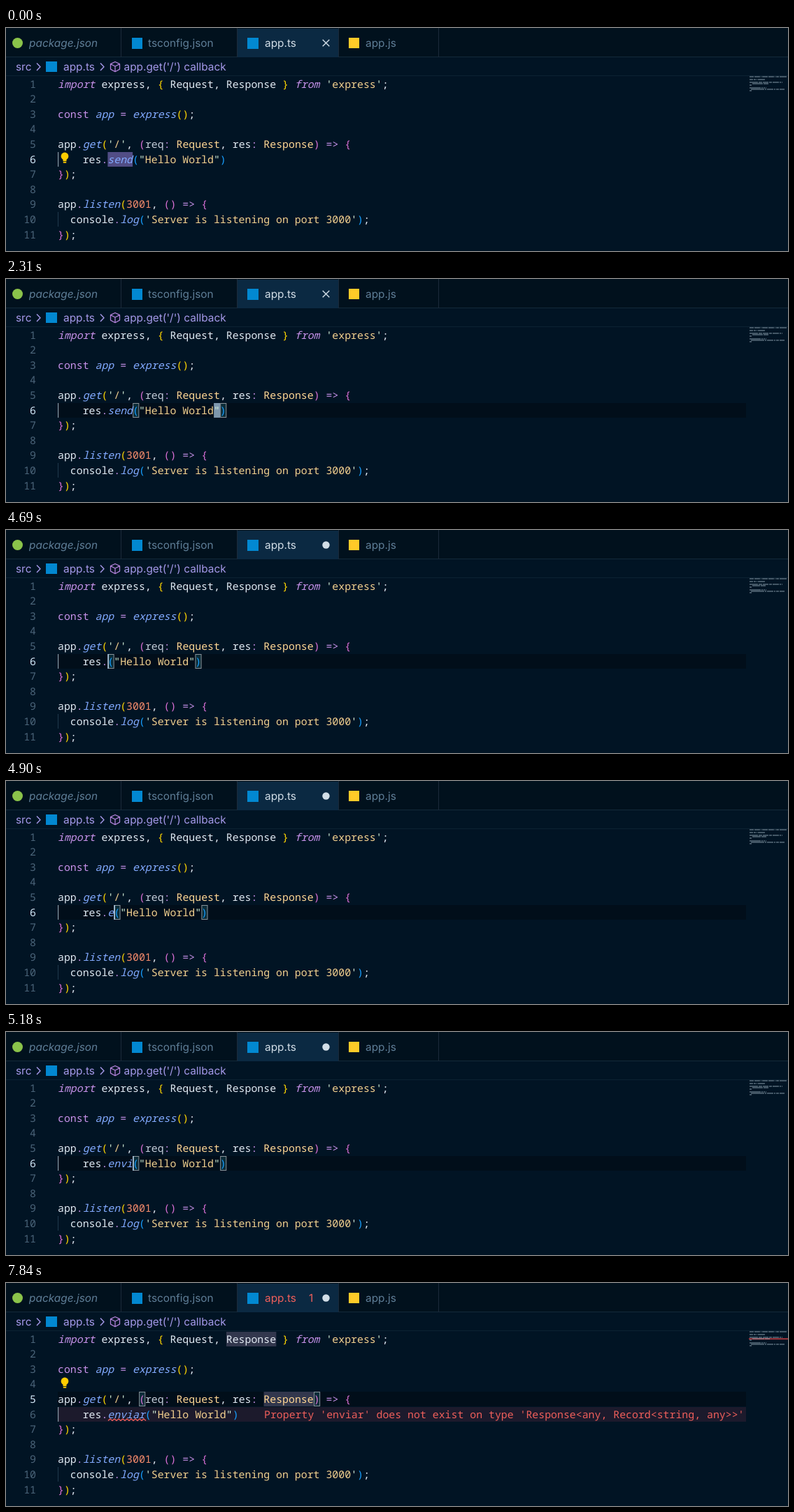
These frames come from a looping animation (1118x320 px, 8 s). An HTML page:

```html
<!DOCTYPE html>
<html lang="en">
<head>
<meta charset="utf-8">
<title>Code editor</title>
<style>
  html, body { margin: 0; width: 100%; height: 100%; overflow: hidden; background: #011424; }
  svg { display: block; width: 1118px; height: 320px; }
  text { white-space: pre; text-rendering: geometricPrecision; }
  .code { font: 500 14.875px "Noto Sans Mono", "DejaVu Sans Mono", monospace; }
  .ui { font: 15.4px Inter, Roboto, sans-serif; }
  .doc { font: 14.3px Inter, Roboto, sans-serif; }
  .slant { font-style: italic; }
</style>
</head>
<body>
<svg id="stage" viewBox="0 0 1118 320" xmlns="http://www.w3.org/2000/svg"></svg>
<script>
const LOOP = 8000, LEFT = 74, CHAR = 8.925, ROW = 21.6;
const CLICK_TYPE = 3080, CLICK_BACK = 6300, ERROR = 5810;
const WHITE = '#e1e9f2', PURPLE = '#c792ea', BLUE = '#82aaff', RED = '#ef5f5b';

// The first character of each code segment picks its style.
const STYLES = {
  w: [WHITE], k: [PURPLE], K: [PURPLE, 1], f: [BLUE, 1], s: ['#f3d08f'], q: ['#d9f5dd'],
  y: ['#ffd694'], p: ['#c3ccd8'], n: ['#f78c6c'], 1: ['#ffd700'], 2: ['#da70d6'], 3: ['#179fff']
};
const codeLines = method => [
  "Kimport|w express, |1{|w Request, Response |1}|K from |q'|sexpress|q'|w;",
  '',
  'kconst |fapp|k = |fexpress|1()|w;',
  '',
  "wapp|k.|fget|1(|q'|s/|q'|w, |2(|preq|k: |yRequest|w, |wres|k: |yResponse|2)|k => |2{",
  `w    res|k.|f${method}|3(|q"|sHello World|q"|3)`,
  '2}|1)|w;',
  '',
  'wapp|k.|flisten|1(|n3001|w, |2()|k => |2{',
  "w  console|k.|flog|3(|q'|sServer is listening on port 3000|q'|3)|w;",
  '2}|1)|w;'
];

const EDITS = [[0, 'send'], [3850, 'sen'], [4060, 'se'], [4270, 's'], [4480, ''],
  [4900, 'e'], [4970, 'en'], [5040, 'env'], [5110, 'envi'], [5250, 'envia'], [5390, 'enviar']];
const CARET_TOGGLES = [1470, 2310, 2590, 3570, 3850, 5880, 6300, 6790, 7350, 7840];

const colX = col => LEFT + col * CHAR;
const rowY = line => Math.round(69.7 + (line - 1) * ROW);
const baseY = line => 85.5 + (line - 1) * ROW;
const within = (t, from, to) => t >= from && t < to;
const esc = s => s.replace(/&/g, '&amp;').replace(/</g, '&lt;');

const rect = (x, y, w, h, fill, more = '') =>
  `<rect x="${x}" y="${y}" width="${w}" height="${h}" fill="${fill}" ${more}/>`;
const path = (d, stroke, width = 1.2) =>
  `<path d="${d}" fill="none" stroke="${stroke}" stroke-width="${width}" stroke-linejoin="round"/>`;
const label = (kind, x, y, str, fill, more = '') =>
  `<text class="${kind}" xml:space="preserve" x="${x}" y="${y}" fill="${fill}" ${more}>${esc(str)}</text>`;
const dot = (x, y, r, fill) => `<circle cx="${x}" cy="${y}" r="${r}" fill="${fill}"/>`;
const cross = (x, y, r, color) =>
  path(`M${x - r} ${y - r}l${2 * r} ${2 * r}m0 ${-2 * r}l${-2 * r} ${2 * r}`, color, 1.4);
const cube = (x, y, color) => path(
  `M${x} ${y - 7}l6.5 3.2v7.4l-6.5 3.6l-6.5 -3.6v-7.4zM${x - 6.5} ${y - 3.8}l6.5 3.3l6.5 -3.3M${x} ${y - .5}v7.5`, color, 1.3);
const chevron = x => path(`M${x} 50.5l5 5.2l-5 5.2`, '#a599e9', 1.4);

const rowBox = (line, fill) => rect(LEFT, rowY(line), 984, 21, fill);
const cellBox = (line, col, len, fill) => rect(colX(col), rowY(line), len * CHAR, 21, fill);
const bracket = (line, col) => rect(colX(col) + .6, rowY(line) + .5, CHAR - .8, 20,
  '#0c2c38', 'stroke="#8a9299" stroke-width="1"');
const bulb = line => {
  const y = rowY(line) + 6;
  return dot(84, y, 5.4, '#fc0') + rect(81.5, y + 3, 5, 4.2, '#fc0') +
    rect(81.8, y + 8, 4.4, 1.7, '#fc0');
};

function codeText(line, source) {
  if (!source) return '';
  const spans = source.split('|').map(part => {
    const [fill, italic] = STYLES[part[0]];
    return `<tspan fill="${fill}"${italic ? ' class="slant"' : ''}>${esc(part.slice(1))}</tspan>`;
  });
  return `<text class="code" xml:space="preserve" x="${LEFT}" y="${baseY(line)}">${spans.join('')}</text>`;
}

function minimap(lines, error) {
  let out = error ? rect(1062, 79.3, 56, 1.8, '#b03a3f') : '';
  lines.forEach((source, i) => {
    const plain = source.split('|').map(p => p.slice(1)).join('');
    for (const word of plain.matchAll(/\S+/g))
      out += rect(1063 + word.index, 69.3 + i * 2, word[0].length, 1.3, '#a9bccb', 'opacity=".6"');
  });
  return out;
}

function tabs(s) {
  const edge = x => rect(x, 0, 1, 42, '#1b2a3a');
  const muted = '#5f7e97', blue = '#0288d1';
  return rect(0, 0, 1118, 42, '#01111d') + rect(0, 41, 1118, 1, '#14293a') +
    rect(331, 1, 145, 41, '#0b2942') + [164, 330, 475, 618].map(edge).join('') +
    dot(16.5, 21.5, 7.5, '#8bc34a') +
    label('ui slant', 33, 27, 'package.json', muted) +
    rect(180, 14, 15, 16, blue) + label('ui', 203, 27, 'tsconfig.json', muted) +
    rect(345, 14, 16, 16, blue) + label('ui', 370, 27, 'app.ts', s.error ? RED : '#d2dee7') +
    (s.error ? label('ui', 433, 27, '1', RED) : '') +
    (s.dirty ? dot(457.5, 21.5, 5.2, '#d2dee7') : cross(457.5, 21.5, 4.8, '#d2dee7')) +
    rect(490, 14, 15, 15, '#ffca28') + label('ui', 514, 27, 'app.js', muted);
}

function breadcrumb() {
  const color = '#a599e9';
  return label('ui', 14, 61, 'src', color) + chevron(44) + rect(57, 48, 16, 15, '#0288d1') +
    label('ui', 82, 61, 'app.ts', color) + chevron(135) + cube(156, 55.5, '#b180d7') +
    label('ui', 168.5, 61, "app.get('/') callback", color) + rect(0, 68, 1118, 1, '#0c2233');
}

function popup() {
  const grey = '#a3a7bd', light = '#d6deeb', bg = '#2c2f43';
  const docs = ['(method) internal.Writable.end(cb?: (()',
    '=> void) | undefined): express.Response<', 'any, Record<string, any>> (+2 overloads)'];
  const chip = (x, y, w, str) => rect(x, y - 14, w, 18, '#464a5c', 'rx="3"') +
    label('code', x + 5, y, str, light);
  return rect(173, 199, 517, 23, '#5f7e9a', 'stroke="#2b3f54"') + cube(186, 211, '#fff') +
    `<text class="code" x="200" y="216.5" fill="#fff"><tspan font-weight="700">ev</tspan>entNames</text>` +
    rect(690, 199, 397, 122, bg, 'stroke="#3b3f54"') +
    docs.map((str, i) => label('code', 697, 221.5 + i * ROW, str, grey)).join('') +
    cross(1073.5, 215, 4.3, light) +
    label('doc', 697, 304.5, 'Calling the', light) + chip(773, 304.5, 132, 'writable.end()') +
    label('doc', 910, 304.5, 'method signals that no', light) +
    label('doc', 697, 326, 'more data will be written to the', light) +
    chip(912, 326, 80, 'Writable') + label('doc', 993, 326, '. The', light);
}

function squiggle(from, to) {
  let d = `M${from} 197.5`;
  for (let x = from, up = true; x < to; x += 3, up = !up) d += `l3 ${up ? -2.6 : 2.6}`;
  return path(d, RED, 1.3);
}

function stateAt(t) {
  return {
    method: EDITS.filter(e => e[0] <= t).pop()[1],
    selected: t < 1470,
    quote: within(t, 1820, 2590),
    word: within(t, 3290, 3850),
    dirty: t >= 3850,
    popup: within(t, 5040, 5110),
    error: t >= ERROR,
    line: t < CLICK_BACK ? 6 : 5,
    inMethod: t >= CLICK_TYPE,
    occurrences: t >= 6580,
    caret: CARET_TOGGLES.filter(x => x <= t).length % 2 === 1
  };
}

function draw(s) {
  const lines = codeLines(s.method);
  const open = 8 + s.method.length, close = open + 14;
  const caretCol = s.line === 5 ? 39 : s.inMethod ? open : 26;
  let out = rect(0, 0, 1118, 320, '#011424') + tabs(s) + breadcrumb();

  if (!s.selected) out += rowBox(s.line, '#010e1a');
  if (s.error) out += rowBox(6, '#1c1a2c');
  out += rect(74, rowY(6), 1.2, 21, '#8a98a5') + rect(74, rowY(10), 1, 21, '#20384c');

  if (s.selected) out += cellBox(6, 8, 4, '#514d85');
  if (s.word) out += cellBox(6, 8, 4, '#32374d');
  if (s.occurrences) out += cellBox(1, 27, 8, '#32374d') + cellBox(5, 33, 8, '#32374d');
  if (s.line === 5) out += bracket(5, 13) + bracket(5, 41);
  else if (!s.selected) out += bracket(6, open) + bracket(6, close);
  if (s.quote) out += cellBox(6, 25, 1, '#7d97ad');

  lines.forEach((source, i) => {
    const n = i + 1;
    out += label('code', 43, baseY(n), String(n), n === s.line ? '#d5e8f8' : '#4b6479', 'text-anchor="end"');
    out += codeText(n, source);
  });
  if (s.error) out += squiggle(146, 199) + label('code', 369, baseY(6),
    "Property 'enviar' does not exist on type 'Response<any, Record<string, any>>'", RED);
  if (s.selected) out += bulb(6);
  if (s.occurrences) out += bulb(4);
  if (s.caret) out += rect(colX(caretCol), rowY(s.line), 1.7, 21, '#a9c2d8');
  out += minimap(lines, s.error);
  return out + (s.popup ? popup() : '');
}

const stage = document.getElementById('stage');
const start = performance.now();
let shown = '';
function tick() {
  const state = stateAt((performance.now() - start) % LOOP);
  const key = JSON.stringify(state);
  if (key !== shown) {
    stage.innerHTML = draw(state);
    shown = key;
  }
  requestAnimationFrame(tick);
}
tick();
</script>
</body>
</html>
```
